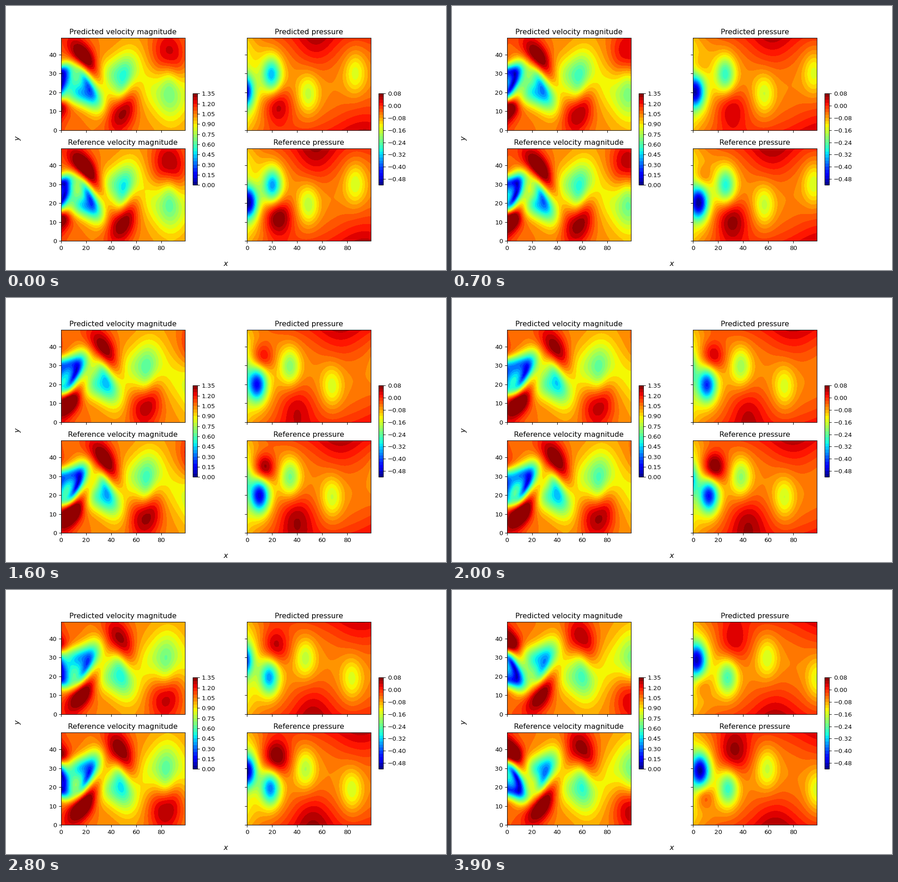
A matplotlib script for the animation above (4000 ms loop, 966 by 580 pixels).

```python
import numpy as np
import matplotlib.pyplot as plt
from matplotlib.animation import FuncAnimation

FRAMES, INTERVAL, DPI = 40, 100, 96
HALF = 30          # frames between vortices shed on opposite sides
NX, NY = 100, 50
X, Y = np.meshgrid(np.arange(NX), np.arange(NY))
MID = (NY - 1) / 2
OFF = np.abs(Y - MID)

V_LEVELS = np.arange(28) / 20
P_LEVELS = np.arange(-26, 5) / 50


def sigmoid(z):
    return 1 / (1 + np.exp(-z))


def track_x(age, drag=0):
    """Vortices leave the inlet slowly and speed up downstream."""
    return 1 + 0.5 * age + 0.005 * age ** 2 - drag * np.exp(-(age / 25) ** 2)


def bump(x, y, sx, sy, lean=0):
    dy = Y - y
    return np.exp(-(((X - x - lean * dy) / sx) ** 2 + (dy / sy) ** 2) / 2)


def street(shape, t, mirror_sign):
    """Sum a lower-side shape over all ages; every other one is mirrored."""
    total = np.zeros(X.shape)
    for n in range(-2, 5):
        part = shape(t + HALF * n)
        total += mirror_sign * part[::-1] if n % 2 else part
    return total


def mean_flow():
    near = np.exp(-X / 25)
    depth = 0.12 + 0.8 * near
    width = 13 - 3.5 * near
    power = 2 + 2 * near
    return 1.02 + 0.08 * near - depth * np.exp(-(OFF / width) ** power)


U_MEAN = mean_flow()
P_MEAN = -0.07 + 0.06 * (OFF / MID) ** 2 - 0.09 * np.exp(-X / 16)


def speed(t, gain=1, drag=0):
    def stream(age):
        peak = 0.5 * gain * np.exp(-age / 170) * sigmoid((age + 2) / 6)
        sx, sy = 6.5 + 0.03 * age, 8 + 0.045 * age
        lean = 0.6 * np.exp(-((age - 20) / 45) ** 2)
        return peak * sy * np.exp(0.5) * bump(track_x(age, drag), 20,
                                              sx, sy, lean)

    psi_y, psi_x = np.gradient(street(stream, t, -1))
    return np.hypot(U_MEAN + psi_y, psi_x)


def pressure(t, low=1, high=1, drag=0):
    def core(age):
        depth = 0.1 + 0.31 * sigmoid((33 - age) / 9)
        return -low * depth * sigmoid((age + 11) / 4) * bump(
            track_x(age, drag), 20.3 - 0.018 * age,
            5.2 + 0.01 * age, 6 + 0.02 * age)

    def ridge(age):
        height = 0.045 + 0.5 * high * np.exp(-age / 25)
        size = 3 + 0.15 * max(age, 0)
        y = 16.5 * sigmoid((54 - age) / 10) - 1
        return height * sigmoid((age - 18) / 4) * bump(
            track_x(age, drag), y, size, 0.9 * size)

    return P_MEAN + street(core, t, 1) + street(ridge, t + 35, 1)


fig, axes = plt.subplots(2, 2, sharex=True, sharey=True,
                         figsize=(966 / DPI, 580 / DPI), dpi=DPI)

PANELS = [
    (axes[0, 0], "Predicted velocity magnitude", V_LEVELS,
     lambda t: speed(t, gain=0.88, drag=2.5)),
    (axes[1, 0], "Reference velocity magnitude", V_LEVELS, speed),
    (axes[0, 1], "Predicted pressure", P_LEVELS,
     lambda t: pressure(t, low=0.92, high=0.65, drag=3)),
    (axes[1, 1], "Reference pressure", P_LEVELS, pressure),
]


def draw(t):
    drawn = []
    for ax, _, levels, field in PANELS:
        z = np.clip(field(t), levels[0] + 1e-3, levels[-1] - 1e-3)
        drawn.append(ax.contourf(X, Y, z, levels=levels, cmap="jet"))
    return drawn


contours = draw(0)
for ax, title, *_ in PANELS:
    ax.set_title(title)
    ax.set(xlim=(0, NX - 1), ylim=(0, NY - 1),
           xticks=range(0, 100, 20), yticks=range(0, 50, 10))

fig.colorbar(contours[0], ax=list(axes[:, 0]), shrink=0.45,
             ticks=V_LEVELS[::3])
fig.colorbar(contours[2], ax=list(axes[:, 1]), shrink=0.45,
             ticks=P_LEVELS[2::4])
fig.supxlabel("$x$")
fig.supylabel("$y$")


def update(t):
    global contours
    for c in contours:
        c.remove()
    contours = draw(t)
    return contours


anim = FuncAnimation(fig, update, frames=FRAMES, interval=INTERVAL,
                     repeat=True, repeat_delay=0, blit=False)
plt.show()
```
